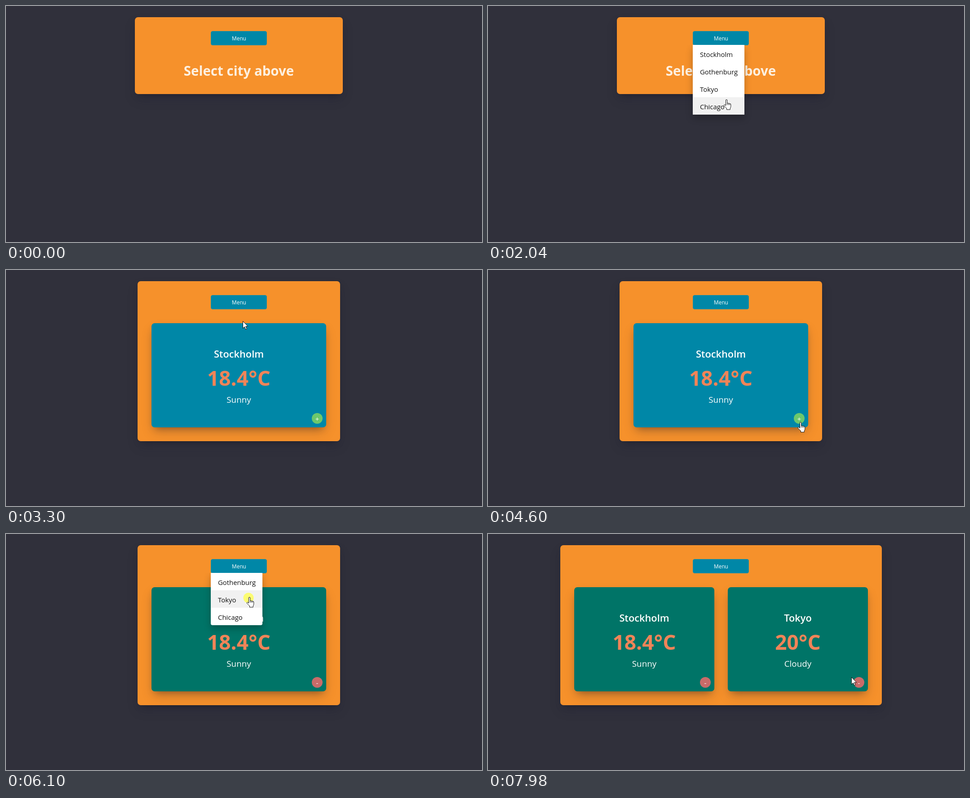
These frames come from a looping animation (1060x528 px, 8 s). An HTML page:

```html
<!DOCTYPE html>
<html lang="en">
<head>
<meta charset="utf-8">
<title>City weather</title>
<style>
html, body { margin: 0; width: 100%; height: 100%; overflow: hidden; background: #30303b; }
body { position: relative; font-family: "Open Sans", "Noto Sans", sans-serif; color: #fff; cursor: none; }
div, p, svg { position: absolute; box-sizing: border-box; }
p { margin: 0; width: 100%; line-height: 0; text-align: center; white-space: nowrap; }
p span { padding: 4px 0; }
.panel, .card { border-radius: 7px;
  box-shadow: 0 13px 27px -5px rgba(30,30,60,.25), 0 8px 16px -8px rgba(0,0,0,.35); }
.panel { top: 25px; display: flex; gap: 30px; padding: 94px 31px 31px; background: #f6912b; }
.title { left: 0; top: 119.5px; font-size: 29.5px; font-weight: 700; color: #fdf0e0; }
.card { position: relative; flex: 1; height: 233px; background: #0087a7; }
.card.saved { background: #007467; }
.city { top: 68.5px; font-size: 21.8px; font-weight: 600; }
.temp { top: 121.5px; font-size: 46px; font-weight: 700; color: #f08458; }
.sky { top: 170.5px; font-size: 18.8px; }
.badge { right: 8px; top: 201px; width: 24px; height: 24px; border-radius: 50%;
  background: #6cc86c; text-align: center; font-size: 15px; line-height: 27px; }
.saved .badge { background: #c96b69; }
.button { left: 456px; top: 56px; width: 125px; height: 32px; border: 1px solid #2a8f98; border-radius: 4px;
  background: #0087a7; text-align: center; font-size: 11.8px; font-weight: 500; line-height: 30px; text-indent: 1px; }
.menu { left: 456px; top: 87px; width: 115px; background: #fff; color: #111;
  border-radius: 0 0 4px 4px; box-shadow: 0 8px 16px rgba(0,0,0,.25); clip-path: inset(0 -30px -30px); }
.item { position: static; height: 39px; padding: 1px 0 0 16px; font-size: 14.9px; line-height: 40px; }
.item.hover { background: #f1f1f1; }
svg { left: 0; top: 0; pointer-events: none; overflow: hidden; }
</style>
</head>
<body>
<div id="stage"></div>
<svg width="1060" height="528">
  <g id="pointer">
    <circle id="press" cy="2" r="11.5" fill="#ffff46" fill-opacity=".75"/>
    <path id="arrow" fill="#fff" stroke="#111"
      d="M.5.5V16.500l3.700-3.500 2.600 6 2.500-1.100-2.600-5.800h5z"/>
    <path id="hand" transform="translate(-4.500 0)" fill="#fff" stroke="#111"
      d="M5 14V2a1.600 1.600 0 0 1 3.200 0v6.500q1.400-1 2.800.4 1.500-.8 2.700.6 2.600-.4 2.600 2v4q0 2.500-1.600 4.500v2.800H7V20L1.200 14.200q-1-2 .8-2.700 1.500 0 3 2.500M8.200 8.500v4M11 9v3.500M13.700 9.600v3"/>
    <path id="beam" fill="none" stroke="#a5a09f" d="M-3 -7.500H4M-3 7.500H4M.5 -7.500V7.500"/>
  </g>
</svg>
<script>
const DURATION = 8000;
const CENTER = 518.5;
const WEATHER = { Stockholm: ["18.4°C", "Sunny"], Tokyo: ["20°C", "Cloudy"] };
const CITIES = ["Stockholm", "Gothenburg", "Tokyo", "Chicago"];

const byId = id => document.getElementById(id);
const line = (cls, text) => `<p class="${cls}"><span>${text}</span></p>`;

function card(city, saved) {
  const [temp, sky] = WEATHER[city];
  return `<div class="card ${saved ? "saved" : ""}">` +
    line("city", city) + line("temp", temp) + line("sky", sky) +
    `<div class="badge hand">${saved ? "-" : "+"}</div></div>`;
}

function page(width, height, content) {
  const left = Math.round(CENTER - width / 2);
  return `<div class="panel" style="left:${left}px;width:${width}px;height:${height}px">${content}</div>` +
    `<div class="button hand">Menu</div>`;
}

const menu = cities =>
  `<div class="menu">${cities.map(city => `<div class="item hand">${city}</div>`).join("")}</div>`;

const empty = page(463, 172, line("title", "Select city above"));
const single = saved => page(451, 358, card("Stockholm", saved));
const pair = saved => page(716, 358, card("Stockholm", true) + card("Tokyo", saved));

// Every scene after the first is opened by a click.
const SCENES = [
  { at: 0, html: empty },
  { at: 1280, html: empty + menu(CITIES) },
  { at: 3230, html: single(false) },
  { at: 4640, html: single(true) },
  { at: 5720, html: single(true) + menu(CITIES.slice(1)) },
  { at: 6260, html: pair(false) },
  { at: 7820, html: pair(true) }
];
const PRESS_LEAD = 160, PRESS_END = 50;

const ENTRY = [1060, 195];
const SPOTS = {
  menu: [546, 81], chicago: [529, 209], stockholm: [527, 114], tokyo: [540, 141],
  panelEdge: [731, 320], firstBadge: [694, 340], cardText: [663, 272],
  secondBadge: [818, 329], besideBadge: [809, 320]
};
const MOVES = [
  [620, 1010, "menu"],
  [1580, 2040, "chicago"],
  [2110, 2390, "stockholm"],
  [3360, 3920, "panelEdge"],
  [3950, 4230, "firstBadge"],
  [4780, 5560, "menu"],
  [5750, 6060, "tokyo"],
  [6400, 6780, "besideBadge"],
  [6780, 7050, "cardText"],
  [7210, 7450, "secondBadge"],
  [7850, 7980, "besideBadge"]
];

const smooth = u => u * u * (3 - 2 * u);

function pointerAt(time) {
  let place = ENTRY;
  for (const [start, end, spot] of MOVES) {
    const u = Math.min(1, Math.max(0, (time - start) / (end - start)));
    place = place.map((from, axis) => from + (SPOTS[spot][axis] - from) * smooth(u));
  }
  return place.map(Math.round);
}

function pointerShape(element) {
  if (element?.tagName === "SPAN") return "beam";
  return element?.classList.contains("hand") ? "hand" : "arrow";
}

const show = (id, visible) => byId(id).style.display = visible ? "" : "none";
let shown;

function render(time) {
  const { html } = SCENES.findLast(scene => scene.at <= time);
  if (html !== shown) byId("stage").innerHTML = shown = html;

  const [x, y] = pointerAt(time);
  const under = document.elementFromPoint(x, y);
  const shape = pointerShape(under);
  for (const id of ["arrow", "hand", "beam"]) show(id, id === shape);
  show("pointer", time >= MOVES[0][0]);
  show("press", SCENES.some(({ at }) => time >= at - PRESS_LEAD && time < at - PRESS_END));
  byId("pointer").setAttribute("transform", `translate(${x} ${y})`);
  document.querySelectorAll(".item").forEach(item => item.classList.toggle("hover", item === under));
}

const start = performance.now();
function tick() {
  render((performance.now() - start) % DURATION);
  requestAnimationFrame(tick);
}
tick();
</script>
</body>
</html>
```
